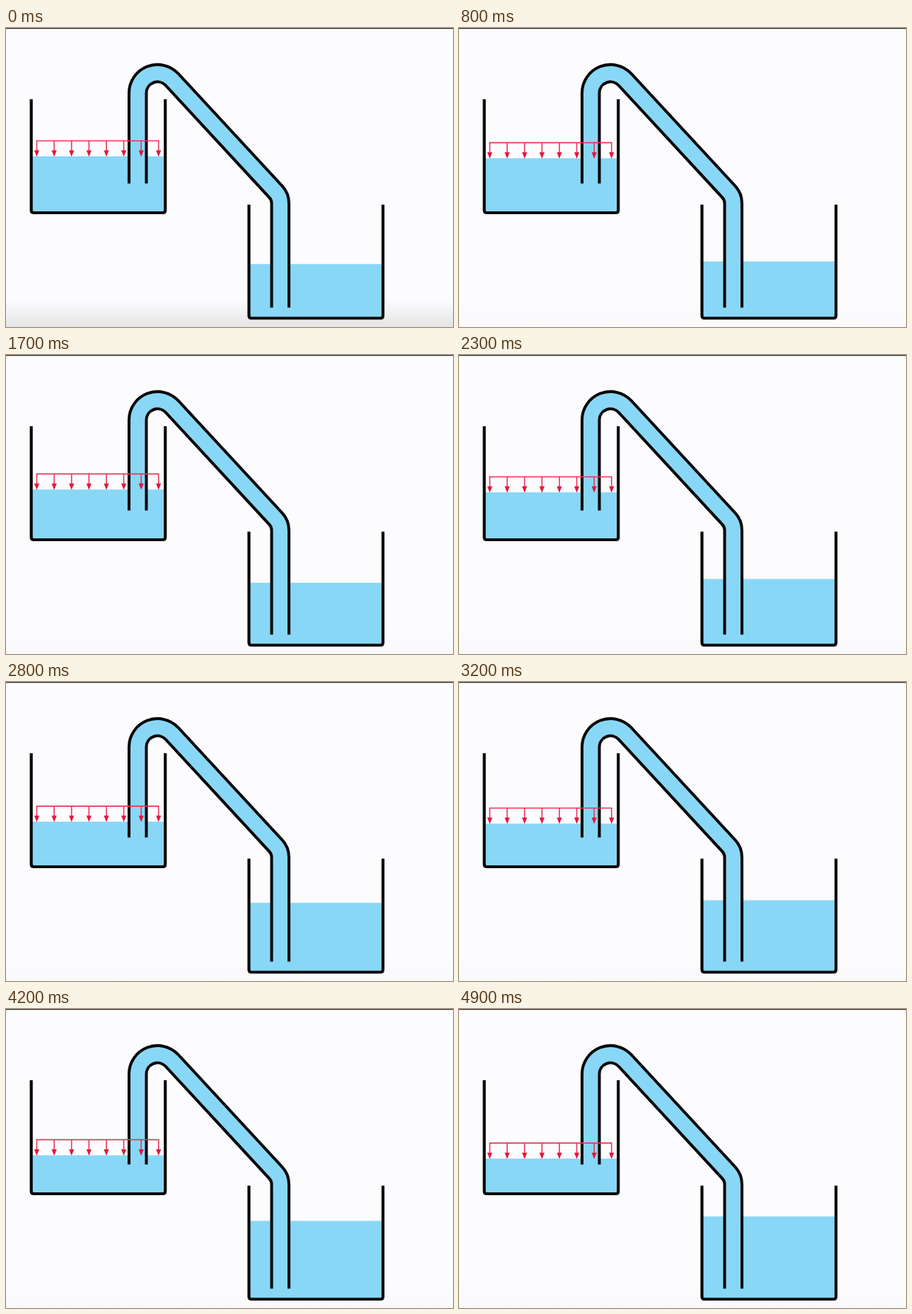
An HTML page that plays this animation: 632 by 424 pixels, repeating every 5 s.

```html
<!DOCTYPE html>
<html lang="en">
<head>
<meta charset="utf-8">
<title>Siphon</title>
<style>
html, body { margin: 0; width: 100%; height: 100%; overflow: hidden; background: #fcfbfe; }
svg { display: block; }
#scene { filter: blur(0.7px); }
</style>
</head>
<body>
<svg width="632" height="424" viewBox="0 0 632 424" fill="none">
  <defs>
    <linearGradient id="shade" x2="0" y2="1">
      <stop stop-color="#e4e4e5" stop-opacity="0"/>
      <stop offset="1" stop-color="#e4e4e5"/>
    </linearGradient>
    <path id="pipe" d="M186.2 220.5V92A28 28 0 0 1 234.6 73L381.4 232.2A24 24 0 0 1 387.8 248.7V396.5"/>
    <path id="tank" d="M0 0V157.5Q0 161 3.5 161H186Q189.5 161 189.5 157.5V0"/>
    <g id="arrow">
      <path d="M0-22V-7" stroke="#e8365a" stroke-width="1.6"/>
      <path d="M-3.6-8.5H3.6L0 .5Z" fill="#e3173c"/>
    </g>
  </defs>
  <rect width="632" height="424" fill="#fcfbfe"/>
  <rect id="floor" y="386" width="632" height="38" fill="url(#shade)"/>
  <rect width="632" height="1.2" fill="#29292b"/>
  <g id="scene">
    <g fill="#89d7f6">
      <rect id="upper" x="36" width="188.5"/>
      <rect id="lower" x="344" width="188.5"/>
    </g>
    <g stroke="#080808" stroke-width="4.2">
      <use href="#tank" x="35.7" y="101"/>
      <use href="#tank" x="343.5" y="250.5"/>
    </g>
    <use href="#pipe" stroke="#080808" stroke-width="28.6"/>
    <!-- square caps carry the water past the open ends of the walls -->
    <use href="#pipe" stroke="#89d7f6" stroke-width="20.4" stroke-linecap="square"/>
    <g id="load"><path d="M42.7-22H216.3" stroke="#e8365a" stroke-width="1.7"/></g>
  </g>
</svg>
<script>
const el = id => document.getElementById(id);
const LOOP = 5000, STEP = 100;

for (let i = 0; i < 8; i++) {
  const arrow = document.createElementNS("http://www.w3.org/2000/svg", "use");
  arrow.setAttribute("href", "#arrow");
  arrow.setAttribute("x", 43.5 + i * 24.6);
  el("load").append(arrow);
}

function fill(id, top, bottom) {
  el(id).setAttribute("y", top);
  el(id).setAttribute("height", bottom - top);
}

function draw(now) {
  const t = Math.floor(now % LOOP / STEP) * STEP;
  const flow = Math.max(0, t - 400);
  const level = 182 + flow * 0.0067;
  fill("upper", level, 261);
  fill("lower", 334.7 - flow * 0.009, 410.5);
  el("load").setAttribute("transform", `translate(0 ${level})`);
  el("floor").setAttribute("opacity", t < 300 ? 1 : 0.1);
  requestAnimationFrame(draw);
}
draw(performance.now());
</script>
</body>
</html>
```
